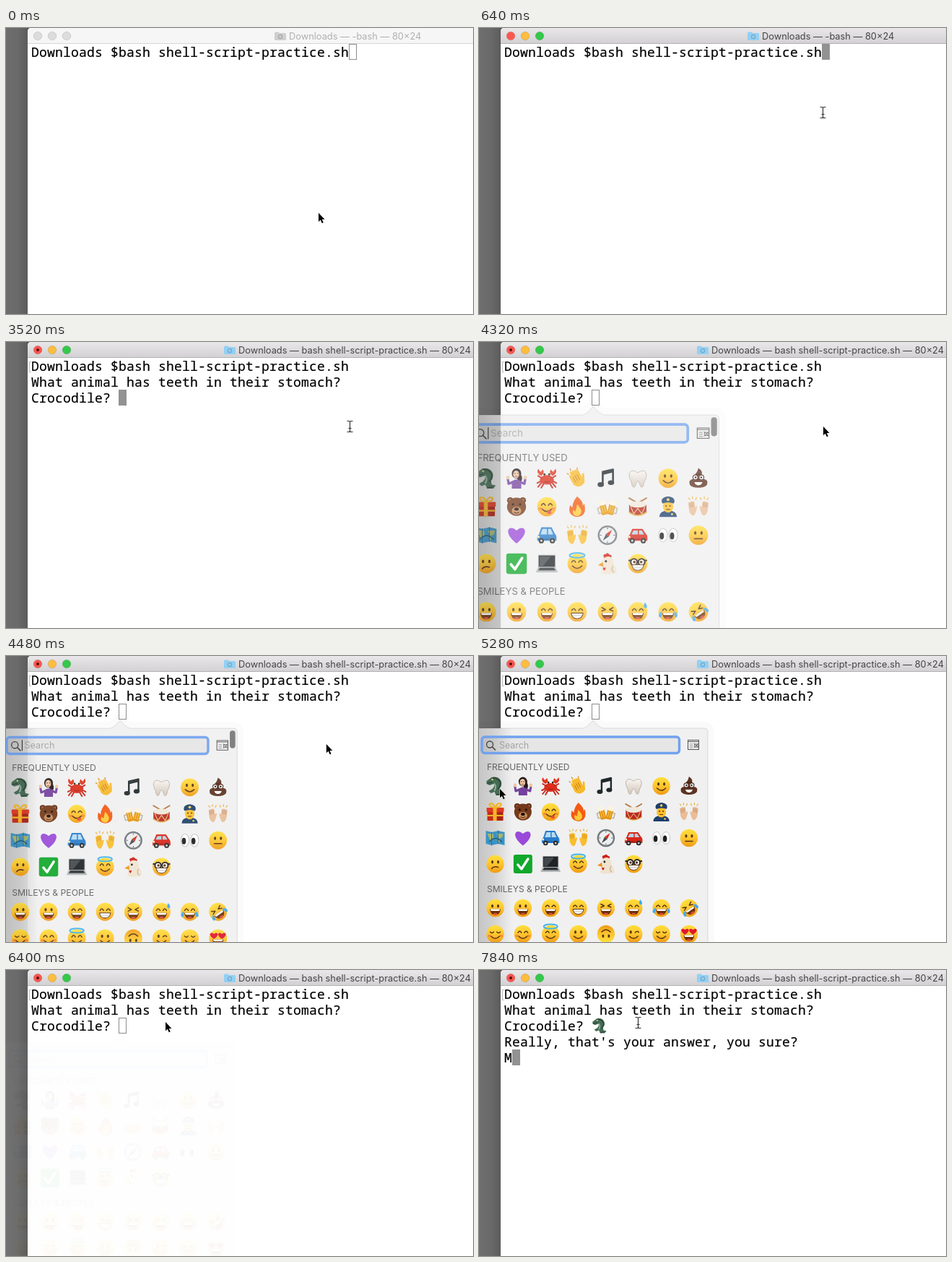
An HTML page that plays this animation: 647 by 396 pixels, repeating every 8 s.

```html
<!DOCTYPE html>
<html lang="en">
<head>
<meta charset="utf-8">
<title>Terminal quiz</title>
<style>
html, body { margin: 0; width: 100%; height: 100%; overflow: hidden; background: #fff; }
svg { display: block; width: 647px; height: 396px; }
.mono { font: 18px "Noto Sans Mono", "DejaVu Sans Mono", monospace; letter-spacing: .2px; white-space: pre; stroke: #000; stroke-width: .2px; }
.ui { font: 12.4px Inter, "Open Sans", sans-serif; }
.caption { font-size: 12.82px; }
.head { font-size: 12px; fill: #626262; }
</style>
</head>
<body>
<svg viewBox="0 0 647 396">
  <defs>
    <linearGradient id="desk"><stop stop-color="#6e6e6e"/><stop offset=".4" stop-color="#6a6a6a"/><stop offset=".8" stop-color="#5a5a5a"/></linearGradient>
    <linearGradient id="bar" x2="0" y2="1"><stop stop-color="#e9e7e9"/><stop offset="1" stop-color="#d2d0d2"/></linearGradient>
    <linearGradient id="glass" gradientUnits="userSpaceOnUse" x1="0" x2="46" y1="0" y2="0"><stop stop-color="#c6c6c6"/><stop offset=".45" stop-color="#d2d2d2"/><stop offset="1" stop-color="#f0f0f0"/></linearGradient>
    <linearGradient id="skin" x2="0" y2="1"><stop stop-color="#ffdf3c"/><stop offset=".5" stop-color="#fdc630"/><stop offset="1" stop-color="#f09a14"/></linearGradient>
    <linearGradient id="enamel" x2="0" y2="1"><stop stop-color="#f7f4ef"/><stop offset="1" stop-color="#d3c6ba"/></linearGradient>
  </defs>
  <rect width="40" height="396" fill="url(#desk)"/>
  <path d="M30 396V5q0-5 5-5H647V396z" fill="#fff"/>
  <path id="titlebar" d="M30 22V5q0-5 5-5H647V22z"/>
  <path id="barLine" d="M30 21.500H647"/>
  <g id="lights"></g>
  <g id="folder">
    <path d="M0 2q0-1.500 1.500-1.500h4l1.500 1.500h7.500q1.500 0 1.500 1.500v7.500q0 1-1 1h-14q-1 0-1-1z"/>
    <circle cx="8" cy="7" r="2.600" fill="none" stroke="#000" stroke-opacity=".2" stroke-width="1.200"/>
  </g>
  <text id="title" class="ui caption" y="16"></text>
  <path id="mark" d="M35 27.500H32.500V41.500H35" fill="none" stroke="#bbb"/>
  <rect id="cursor"/>
  <g id="lines" class="mono"></g>
  <g id="inserted" transform="translate(167 77) scale(.8)"></g>
  <g id="popup"></g>
  <g id="arrow"><path d="M0 0V14.500L3.300 11.500 5.600 16.800 7.900 15.800 5.600 10.600H10z" transform="scale(.85)" fill="#000" stroke="#fff" paint-order="stroke" stroke-linejoin="round"/></g>
  <path id="beam" d="M-4-7.500h2.500q1.500 0 1.500 1.500 0-1.500 1.500-1.500H4M-4 7.500h2.500Q0 7.500 0 6q0 1.500 1.500 1.500H4M0-6V6M-2 2.500H2" fill="none" stroke="#333" stroke-width="1.200"/>
</svg>
<script>
const LOOP = 8000, STEP = 160;
const $ = id => document.getElementById(id);
const set = (node, attrs) => { for (const k in attrs) node.setAttribute(k, attrs[k]); };
const show = (node, on) => set(node, { visibility: on ? 'visible' : 'hidden' });

// Markup helpers
const disc = (x, y, r, f) => `<circle cx="${x}" cy="${y}" r="${r}" fill="${f}"/>`;
const oval = (x, y, rx, ry, f) => `<ellipse cx="${x}" cy="${y}" rx="${rx}" ry="${ry}" fill="${f}"/>`;
const box = (x, y, w, h, f, r = 0) => `<rect x="${x}" y="${y}" width="${w}" height="${h}" rx="${r}" fill="${f}"/>`;
const fill = (d, f) => `<path d="${d}" fill="${f}"/>`;
const line = (d, c, w = 1.5) => `<path d="${d}" fill="none" stroke="${c}" stroke-width="${w}" stroke-linecap="round" stroke-linejoin="round"/>`;
const twin = art => art + `<g transform="scale(-1 1)">${art}</g>`;
const turn = (a, art) => `<g transform="rotate(${a})">${art}</g>`;

// Faces
const INK = '#5a3410';
const heart = 'M0 3.500C-7-1-4-5 0-2 4-5 7-1 0 3.500z';
const eyes = {
  dot: twin(oval(4, -2.8, 1.5, 2.2, INK)),
  happy: twin(line('M2-1.800q2.400-4.500 4.800 0', INK)),
  closed: twin(line('M2.200-3q2.400 3 4.800 0', INK)),
  squint: twin(line('M7-5.500L2.500-3 7-1', INK)),
  wink: oval(-4, -2.8, 1.5, 2.2, INK) + line('M2-2q2.500-3 5-.5', INK),
  love: twin(`<g transform="translate(5.500 -3.500) scale(1.250)">${fill(heart, '#e0162e')}</g>`),
  nerd: twin(disc(4.8, -2, 4.1, '#fff') + disc(4.3, -2, 1.7, INK) +
    '<circle cx="4.800" cy="-2" r="4.100" fill="none" stroke="#2a2220" stroke-width="2"/>') + line('M-11-4H-9M9-4H11', '#2a2220', 2)
};
const mouths = {
  open: fill('M-7.500 1.500h15q-1 8-7.500 8t-7.500-8z', '#6b3008') + fill('M-6.700 1.500h13.400l-1 2.500h-11.400z', '#fff') + oval(0, 8, 3, 1.3, '#e0483c'),
  grin: `<path d="M-7.500 1.500h15q-1 7-7.500 7t-7.500-7z" fill="#fff" stroke="${INK}"/>` + line('M-6 4.700H6', '#aaa', .7),
  smile: line('M-6 3q6 6 12 0', INK),
  flat: line('M-5 4.500H5', INK),
  wry: line('M-5 6.500q3-4 9-2', INK)
};
const face = (eye, mouth, extra = '') => disc(0, 0, 12.2, 'url(#skin)') + eyes[eye] + mouths[mouth] + extra;
const blush = twin(oval(8, 2.5, 2.6, 1.8, '#f2603f88'));
const tear = fill('M8-1q6 5 3 8-4 1-3-8z', '#3fa9f0');
const halo = '<ellipse cy="-10.500" rx="9.500" ry="3" fill="none" stroke="#45b4ea" stroke-width="2"/>';
const sweat = fill('M9-12q5 6 1 7.500-4-1-1-7.500z', '#3fa9f0');

// Objects
const croc = fill('M-12-7L-5-12Q4-14 8-7 10-1 6 3L7 8 12 9 9 13H1L-1 8-6 10-9 7-4 4Q0 0-2-3L-8-1-12-3z', '#456b55') +
  line('M-4-11Q4-12 7-5 8 0 4 4', '#2d4a3b', 2) + line('M-1-3Q2 1-1 6', '#8fae9a', 2) +
  line('M-11-4L-4-5M2 12L8 11', '#24382f', 1) + disc(-4, -9, 1.2, '#e4d978');
const hands = (tone, edge) => twin(
  fill('M1.500 0q1-2 2.500 1L5-6q1-2 2 0 1-2.500 2.200 0 1.500-1.500 2 .5 1.800-.5 1.600 1.500L11.500 6Q9 12 5.500 11 3 8 1.500 0z', tone) +
  line('M6.800-5L6.500 0M9-5L8.500 0M11-4L10.500 1', edge, .8) + line('M3.500-9L2.500-11.500M7.500-10V-12.500M11-9l1.500-2', '#eab23a', 1.2));
const car = (body, glass, roof) => fill(`M-12 7Q-13 1-10-1L-7-${roof}H6L10-2Q13 0 12 7z`, body) +
  fill(`M-8-1L-5.500-${roof - 2}H0V-1zM1.500-1V-${roof - 2}H5L8-1z`, glass) +
  twin(disc(7, 7, 3.3, '#242424') + disc(7, 7, 1.5, '#c4c4c4')) + disc(-10.5, 2, 1.4, '#fff2b8') + box(-4, 4, 7, 2, '#0003');
const mug = box(1.5, -5, 8, 14, '#e5930f', 1.5) + line('M4-2V6M7-2V6', '#fac94e', 1) + box(1, -9, 9, 6, '#fbf3df', 2.5) + line('M9.500-1h3v7H9.500', '#b9b29c');

const EMOJI = [[
  croc,
  oval(0, -6, 6, 6.5, '#261a1c') + oval(4, 0, 3, 5, '#261a1c') + fill('M-6 13V4q6-5 12 0V13z', '#75429e') +
    twin(line('M5 5L10 7 11 1', '#75429e', 3) + oval(11, -1, 2.2, 2.4, '#efc5a0')) + oval(-.5, -5, 3.8, 4.8, '#f4cca8') + line('M-2-2.500h3', '#b5453a', 1) + line('M-2.500-6h1M1-6h1', '#33221a', 1),
  oval(0, 2, 9, 6, '#dd2f1c') + twin(line('M6 0L11-3M8 4l4 2M7 6l4 5M4 7l3 5', '#c52a1b', 2) + fill('M7-3Q14-6 11-12L8-8 5-11Q2-6 7-3z', '#e0361f') + line('M3-3V-5', '#b82818') + disc(3, -5, 1.3, '#221')) + line('M-3 4q3 2 6 0', '#8e1a10', 1),
  turn(-28, fill('M-8 5V-5q0-3 2-3l1 2V-10q1-3 3 0 1-3 3 0 2-2 3 1 2-1 2 1V2L8-2q3-1 2 2L6 9Q-4 14-8 5z', '#f7b92c') + line('M-4-3V4M-1-4V3M2-4V3', '#c97f16', 1)) + line('M-11-5l-1.500-1M-8-10l-1-2M0-11V-13', '#d99a2e'),
  line('M-6 8V-8L7-11V5M-6-5.500L7-8.500', '#20282b', 2.4) + oval(-8.5, 8, 4, 3, '#20282b') + oval(4.5, 5.5, 4, 3, '#20282b'),
  '<path d="M0-7Q9-13 11-5 11 0 8 5 7 13 4 11L1 4Q0 3-1 4L-4 11Q-7 13-8 5-11 0-11-5-9-13 0-7z" fill="url(#enamel)" stroke="#b9aa9d" stroke-width=".8"/>',
  face('dot', 'smile'),
  fill('M0-13Q6-9 4-5 9-4 7 1 13 2 11 8 8 12 0 12-8 12-11 8-13 2-7 1-9-4-4-5-1-8 0-13z', '#5c3322') + line('M-6 1Q0 3 6 0M-3-5Q1-4 4-5', '#3c1d12', 1) + twin(disc(3.8, -1, 2.5, '#fff') + disc(3.6, -1, 1.2, '#222')) + fill('M-5 5H5Q4 9 0 9T-5 5z', '#fff')
], [
  box(-11, -3, 22, 15, '#c42a18', 1) + box(3, -3, 8, 15, '#0002') + box(-12, -6, 24, 6, '#dd3a22', 1) + box(-3, -6, 5, 18, '#f3b52c') + line('M-11 5H11', '#f3b52c', 2) + twin(line('M0-6Q3-14 8-11 9-7 0-6', '#f3b52c', 2.2)),
  twin(disc(8, -8, 4, '#5c2b14') + disc(8, -8, 2, '#a86a42')) + oval(0, 0, 12, 11.5, '#74391a') + oval(0, 5, 6, 5, '#c98d58') + twin(disc(4.5, -3, 1.4, '#160c08')) + oval(0, 3, 2.8, 2, '#160c08') + line('M-3 7q3 2 6 0', '#4a2413', 1),
  face('happy', 'smile', oval(3, 7, 2.7, 2.2, '#e8483c') + blush),
  fill('M0-13Q9-5 7-1L9-4Q13 12 0 13-13 11-9-2L-6 1Q-6-6 0-13z', '#f45a14') + fill('M0-3Q7 4 5 8 3 12 0 12-7 11-5 4L-2 6z', '#fecb35'),
  twin(turn(14, mug)),
  line('M-11-11L3-3M11-11L-3-3', '#b2733a', 1.8) + fill('M-11-3V7Q0 15 11 7V-3z', '#bb2a20') + oval(0, -3, 11, 4, '#efe8da') + line('M-11 7Q0 15 11 7', '#e0b046') + line('M-9 0L-5 9 0 2 5 9 9 0', '#e8cc88', 1),
  fill('M-11 13Q-11 5 0 5T11 13z', '#1f3f6b') + oval(0, 0, 6.5, 7.5, '#fbbf2c') + fill('M-8-6Q-9-12 0-13 9-12 8-6L7-4Q0-7-7-4z', '#1f3f6b') + disc(0, -9, 1.8, '#f4d35f') + twin(disc(2.5, -1, 1, INK)) + line('M-2 3.500h4', INK, 1) + disc(5, 9.5, 1.3, '#f4d35f'),
  hands('#e9bd98', '#bf8d69')
], [
  fill('M-13-10L-5-8 4-10 13-8V10L4 8-5 10-13 8z', '#3b93c4') + fill('M-11-6l8 0 1 5-4 6-3-6zM2-6l9 0-1 5-5 2zM3 1l4 1-2 5z', '#a9b56c') + line('M-5-8V10M4-10V8', '#25638c', .8) + line('M-8 5Q0-4 9 5', '#1f4e63', 1.2),
  `<g transform="scale(2.550 3)">${fill(heart, '#9a4ad8')}</g>`,
  car('#2a7cc9', '#b5dcf2', 10),
  hands('#f9bd2e', '#d28a18'),
  disc(0, 0, 12.3, '#70777c') + disc(0, 0, 10, '#eceeef') + turn(40, fill('M0-9L2.500 0h-5z', '#d5301f') + fill('M0 9L2.500 0h-5z', '#444b50')) + line('M0-9v1M0 9v-1M9 0h-1M-9 0h1', '#444', 1),
  car('#d8261a', '#b8d4e2', 8),
  twin('<ellipse cx="6.500" rx="5.500" ry="8.500" fill="#fff" stroke="#c4c4c4"/>') + oval(-8, 1, 2.8, 4.5, '#1c1c1c') + oval(5, 1, 2.8, 4.5, '#1c1c1c'),
  face('dot', 'flat')
], [
  face('dot', 'wry'),
  box(-13, -13, 26, 26, '#12a82c', 3) + line('M-7 1L-2 7 7-7', '#fff', 3.4),
  box(-11, -11, 22, 16, '#8b8f92', 1) + box(-10, -10, 20, 14, '#1f2326') + fill('M-9-9H5L-5 3H-9z', '#43484c') + fill('M-11 4H11L14 11H-14z', '#b5b8ba') + fill('M-9 5H9L11 8.500H-11z', '#2f3335'),
  face('happy', 'smile', halo),
  fill('M-4-7Q-7-12-2-12 0-15 3-11 7-11 4-6z', '#cf2218') + fill('M-8 12Q-6 5-7 0-6-9 1-9T8 2Q13 7 11 12 0 15-8 12z', '#efe3cf') + line('M7 3Q4 8 8 11', '#cdb998') + fill('M-6-2L-12 2-5 4z', '#ec951b') + disc(-2, -3, 1.4, '#222') + fill('M-6 5q2 7 4 0z', '#cf2218'),
  face('nerd', 'grin')
]];
const SMILEYS = [[
  face('dot', 'open'), face('dot', 'open'), face('happy', 'open'), face('happy', 'grin'),
  face('squint', 'open'), face('happy', 'open', sweat), face('happy', 'open', twin(tear)),
  turn(-35, face('squint', 'open', twin(tear)))
], [
  face('closed', 'smile', blush), face('happy', 'smile', blush), face('happy', 'smile', halo),
  face('dot', 'smile'), turn(180, face('dot', 'smile')), face('wink', 'smile'),
  face('closed', 'smile'), face('love', 'open')
]];
const grid = (rows, top) => rows.map((row, r) => row.map((art, c) =>
  `<g transform="translate(${22.5 + 38.35 * c} ${top + 36 * r})">${art}</g>`).join('')).join('');

const panel = 'M-40 100H144Q150 99 158 89 166 99 172 100H312Q317 100 317 105V420H-40z';
$('popup').innerHTML =
  `<path d="${panel}" fill="none" stroke="#000" stroke-opacity=".02" stroke-width="18" stroke-linejoin="round"/>` +
  `<path d="${panel}" fill="url(#glass)" stroke="#000" stroke-opacity=".14" stroke-width=".8"/>` +
  '<rect x="4" y="112" width="273.500" height="22.500" rx="4" fill="#000" fill-opacity=".045" stroke="#72a2ee" stroke-width="3.400"/>' +
  '<circle cx="15" cy="122.500" r="4.500" fill="none" stroke="#444" stroke-width="1.300"/>' + line('M18.500 126l4 4', '#444', 1.6) +
  '<text class="ui" x="28" y="127.500" fill="#a2a2a2">Search</text>' +
  '<g id="transient">' + line('M25 116V130', '#222', 1) + box(307, 103, 7.5, 24, '#777', 3.7) + '</g>' +
  '<rect x="289.500" y="116.500" width="15" height="13" fill="none" stroke="#555"/>' + line('M290 118.500H304', '#555', 1) +
  line('M292 122h4M292 124.500h4M292 127h4', '#999', 1) + line('M299 122h4v4h-4zM298 121l6 6M304 121l-6 6', '#555', .8) +
  '<text class="ui head" x="11" y="158">FREQUENTLY USED</text>' + grid(EMOJI, 180) +
  '<text class="ui head" x="11" y="327">SMILEYS &amp; PEOPLE</text>' + grid(SMILEYS, 349);
$('inserted').innerHTML = croc;
$('lights').innerHTML = [44, 64, 84].map(x => `<circle cx="${x}" cy="11" r="5.800" stroke="#000" stroke-opacity=".14" stroke-width=".8"/>`).join('') +
  disc(44, 11, 2, '#5a0d0a');
$('lines').innerHTML = [0, 1, 2, 3, 4].map(r => `<text x="35" y="${40 + 22 * r}"></text>`).join('');
const rows = [...$('lines').children], lamps = [...$('lights').children];

// Timelines: the last entry at or before t holds
const at = (steps, t) => steps.filter(s => s[0] <= t).pop();
const TYPED = [[0, 0], [1920, 1], [2080, 2], [2240, 3], [2400, 5], [2720, 6], [2880, 7], [3040, 9], [3360, 10], [3520, 11]];
const POPUP = [[0, 1, 0], [4160, .75, .4], [4320, 1.095, .75], [4480, 1.02, .92], [4640, 1, 1], [6240, 1, .4], [6400, 1, .03], [6560, 1, 0]];
const MOVES = [[0, 640, 433, 256, 477, 117], [4320, 5280, 477, 117, 29, 184], [5760, 6400, 29, 184, 221, 72]];

function pointer(t) {
  const [from, to, x0, y0, x1, y1] = at(MOVES, t);
  const u = Math.min(1, (t - from) / (to - from)), k = u * u * (3 - 2 * u);
  return [x0 + (x1 - x0) * k, y0 + (y1 - y0) * k];
}

function caret(t, typed) {
  if (t < 1120) return [40, 0];
  if (t < 1280) return [0, 1];
  if (t < 6560) return [typed, 2];
  if (t < 7360) return [13, 2];
  return [t < 7840 ? 0 : 1, 4];
}

function render(time) {
  const t = Math.floor(time / STEP) * STEP;
  const active = t >= 480, running = t >= 1120;
  const picking = t >= 4000 && t < 6560, focused = active && !picking;
  const typed = at(TYPED, t)[1];

  set($('titlebar'), { fill: active ? 'url(#bar)' : '#f6f6f6' });
  set($('barLine'), { stroke: active ? '#b4b2b4' : '#d6d6d6' });
  ['#fc5650', '#fdbd3e', '#34c84a'].forEach((c, i) => set(lamps[i], { fill: active ? c : '#dcdcdc' }));
  show(lamps[3], running);
  const x = running ? 322 : 392;
  set($('title'), { x, fill: active ? '#454545' : '#b0b0b0' });
  $('title').textContent = `Downloads — ${running ? 'bash shell-script-practice.sh' : '-bash'} — 80×24`;
  set($('folder'), { transform: `translate(${x - 20} 5)`, fill: active ? '#92d0f4' : '#cfcfcf' });
  show($('mark'), running);

  [
    'Downloads $bash shell-script-practice.sh',
    t >= 1280 ? 'What animal has teeth in their stomach?' : '',
    'Crocodile? '.slice(0, typed),
    t >= 7360 ? "Really, that's your answer, you sure?" : '',
    t >= 7840 ? 'M' : ''
  ].forEach((text, i) => { rows[i].textContent = text; });

  const [col, row] = caret(t, typed), inset = focused ? 0 : .5;
  set($('cursor'), {
    x: 35 + 11 * col + inset, y: 22 + 22 * row + inset,
    width: 11 - 2 * inset, height: 22 - 2 * inset,
    fill: focused ? '#929292' : 'none', stroke: focused ? 'none' : '#8c8c8c'
  });
  show($('inserted'), t >= 6560);

  const [, scale, opacity] = at(POPUP, t);
  set($('popup'), { opacity, transform: `translate(154 89) scale(${scale}) translate(-154 -89)` });
  set($('transient'), { opacity: t < 4800 ? 1 : 0 });

  const [px, py] = pointer(t), beam = focused && t >= 640;
  show($('arrow'), !beam);
  show($('beam'), beam);
  set($('arrow'), { transform: `translate(${px} ${py})` });
  set($('beam'), { transform: `translate(${px - .5} ${py + (t > 6400 ? 1 : 0)})` });
}

const start = performance.now();
function tick() {
  render((performance.now() - start) % LOOP);
  requestAnimationFrame(tick);
}
tick();
</script>
</body>
</html>
```
